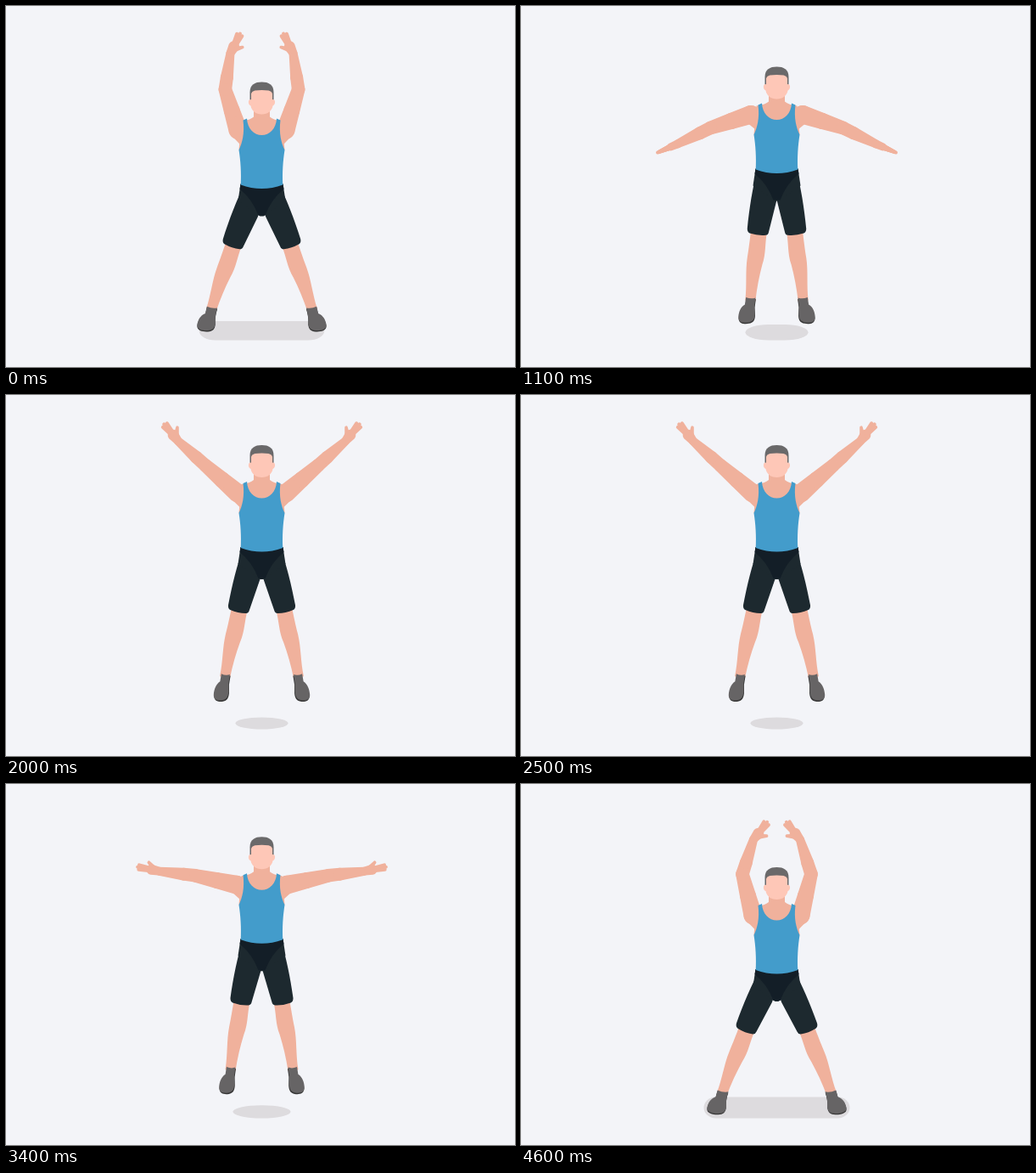
Write an HTML page with a canvas that moves like this. It is 600 by 425 pixels and loops after 4.7 s.

```html
<!DOCTYPE html>
<html lang="en">
<head>
<meta charset="utf-8">
<title>Jumping jacks</title>
<style>
html, body { margin: 0; width: 100%; height: 100%; overflow: hidden; background: #f3f4f8; }
canvas { display: block; }
</style>
</head>
<body>
<canvas id="stage" width="600" height="425"></canvas>
<script>
const ctx = document.getElementById('stage').getContext('2d');
const LOOP = 4700, STEP = 100, CYCLE = LOOP / 5, ARMS_UP = 840, CENTER = 301.5;
const BACK = '#f3f4f8', SKIN = '#f0b19c', FACE = '#fec7b7', HAIR = '#6a696a', SHIRT = '#439ccb';
const SHORTS = '#1d292f', PANEL = '#131e27', SHOE = '#666465', SOLE = '#363636', SHADOW = '#dddbde';

const shapes = {
  chest: 'M-9.5 28V41Q-14 45-24 46L-27 80H27L24 46Q14 45 9.5 41V28Z',
  shirt: 'M-22 45L-17.5 43C-17 55-9 62.5 0 62.5S17 55 17.5 43L22 45C20 60 23 72 27 80C25 92 24 108 24.8 121Q0 130-24.8 121C-24 108-25 92-27 80C-23 72-20 60-22 45Z',
  pelvis: 'M-25 120H25L28 140L2 158H-2L-28 140Z',
  panel: 'M-25 120H25L26 126Q11 138 4 157H-4Q-11 138-26 126Z',
  hair: 'M-14 23V12C-14 3-8 0 0 0S14 3 14 12V23Z',
  face: 'M-12.5 21V14Q-12 11-8 10Q0 9 8 10Q12 11 12.5 14V21C16 19 17 27 13 28C12 34 7 38 0 38S-12 34-13 28C-17 27-16 19-12.5 21Z',
  calf: 'M-8 58C-7 74-10 84-7 98C-5 112-4 126-4 142H8C8 124 12 108 11.5 92C11 80 11 72 11 58Z',
  short: 'M-14-11H12C15 8 16 34 15.5 58Q15 62 12 63Q2 65-7 63Q-10 62-10 59L-15 20Z',
  shoe: 'M-6 0Q0 2 7 0L8 8C14 11 16 17 16 22C16 28 7 28 2 27C-4 26-6 23-6 18Q-4 9-6 0Z'
};
for (const name in shapes) shapes[name] = new Path2D(shapes[name]);

const rad = deg => deg * Math.PI / 180;
const step = (p, deg, len) => [p[0] + len * Math.cos(rad(deg)), p[1] - len * Math.sin(rad(deg))];

// Everything follows from the time q before or after the arms are fully raised.
function poseAt(time) {
  const hurry = 37 * Math.exp(-(((time - 1100) / 150) ** 2));
  const phase = (time + hurry - ARMS_UP + CYCLE) % CYCLE;
  const q = Math.min(phase, CYCLE - phase);
  const spread = (1 + Math.cos(2 * Math.PI * q / CYCLE)) / 2;
  const air = Math.max(0, 1 - ((q - 215) / 130) ** 2);
  const swing = (mid, size, at, pace) => mid + size * Math.tanh((at - q) / pace);
  return {
    air, spread,
    head: 91 + 7 * spread - 36 * air,
    leg: 0.8 + 20 * spread,
    upper: swing(-4, 80, 280, 95),
    fore: swing(5, 105, 262, 115),
    hand: swing(17, 115, 255, 115)
  };
}

function paint(name, color) {
  ctx.fillStyle = color;
  ctx.fill(shapes[name]);
}

// rounded segment whose radius runs from r to s
function taper(p, q, r, s) {
  const dir = Math.atan2(q[1] - p[1], q[0] - p[0]);
  ctx.beginPath();
  ctx.arc(...p, r, dir + Math.PI / 2, dir - Math.PI / 2);
  ctx.arc(...q, s, dir - Math.PI / 2, dir + Math.PI / 2);
  ctx.fill();
}

function drawArm({ upper, fore, hand }) {
  const shoulder = [30 - 2 * Math.sin(rad(upper)), 56.5];
  const biceps = step(shoulder, upper, 24), elbow = step(shoulder, upper, 50);
  const muscle = step(elbow, fore, 14), wrist = step(elbow, fore, 43);
  const palm = step(wrist, hand, 9);
  const open = Math.min(1, Math.max(0, (hand + 20) / 40));
  ctx.fillStyle = SKIN;
  taper([23, 71], shoulder, 4, 11);
  taper(shoulder, biceps, 11, 9.5);
  taper(biceps, elbow, 9.5, 7.8);
  taper(elbow, muscle, 7.8, 7.5);
  taper(muscle, wrist, 7.5, 5);
  taper(wrist, palm, 5, 4.5 + 2 * open);
  for (const turn of [-9, -1, 7])
    taper(palm, step(wrist, hand + turn * open, 26 - Math.abs(turn) / 5), 3.6, 2);
  taper(step(wrist, hand, 4), step(wrist, hand + 36 * open, 16), 3.5, 1.8);
}

function drawLeg({ leg, air }) {
  ctx.save();
  ctx.translate(12.5, 135);
  ctx.rotate(-rad(leg));
  paint('calf', SKIN);
  ctx.save();
  ctx.translate(1.5, 138);
  ctx.rotate(rad(leg * 0.6));
  ctx.scale(1 - 0.22 * air, 1 + 0.14 * air); // toes point down in flight
  ctx.translate(-air, 1.3);
  paint('shoe', SOLE);
  ctx.translate(air, -1.3);
  paint('shoe', SHOE);
  ctx.restore();
  paint('short', SHORTS);
  ctx.restore();
}

function bothSides(draw, pose) {
  for (const side of [-1, 1]) {
    ctx.save();
    ctx.scale(side, 1);
    draw(pose);
    ctx.restore();
  }
}

function drawShadow({ spread, air }) {
  const ground = 36 + 50 * spread ** 2;
  const half = ground + (31 - ground) * air ** 2;
  const height = 25 - 11 * air;
  ctx.fillStyle = SHADOW;
  ctx.beginPath();
  ctx.roundRect(CENTER - half, 393.5 - height, half * 2, height,
    { x: Math.min(half, 14 + 22 * air), y: height / 2 });
  ctx.fill();
}

function render(time) {
  const pose = poseAt(time);
  ctx.fillStyle = BACK;
  ctx.fillRect(0, 0, 600, 425);
  drawShadow(pose);
  ctx.save();
  ctx.translate(CENTER, pose.head);
  bothSides(drawArm, pose);
  paint('chest', SKIN);
  bothSides(drawLeg, pose);
  paint('pelvis', SHORTS);
  paint('panel', PANEL);
  paint('shirt', SHIRT);
  paint('hair', HAIR);
  paint('face', FACE);
  ctx.restore();
}

const start = performance.now();
function tick() {
  const time = (performance.now() - start) % LOOP;
  render(Math.floor(time / STEP) * STEP);
  requestAnimationFrame(tick);
}
tick();
</script>
</body>
</html>
```
